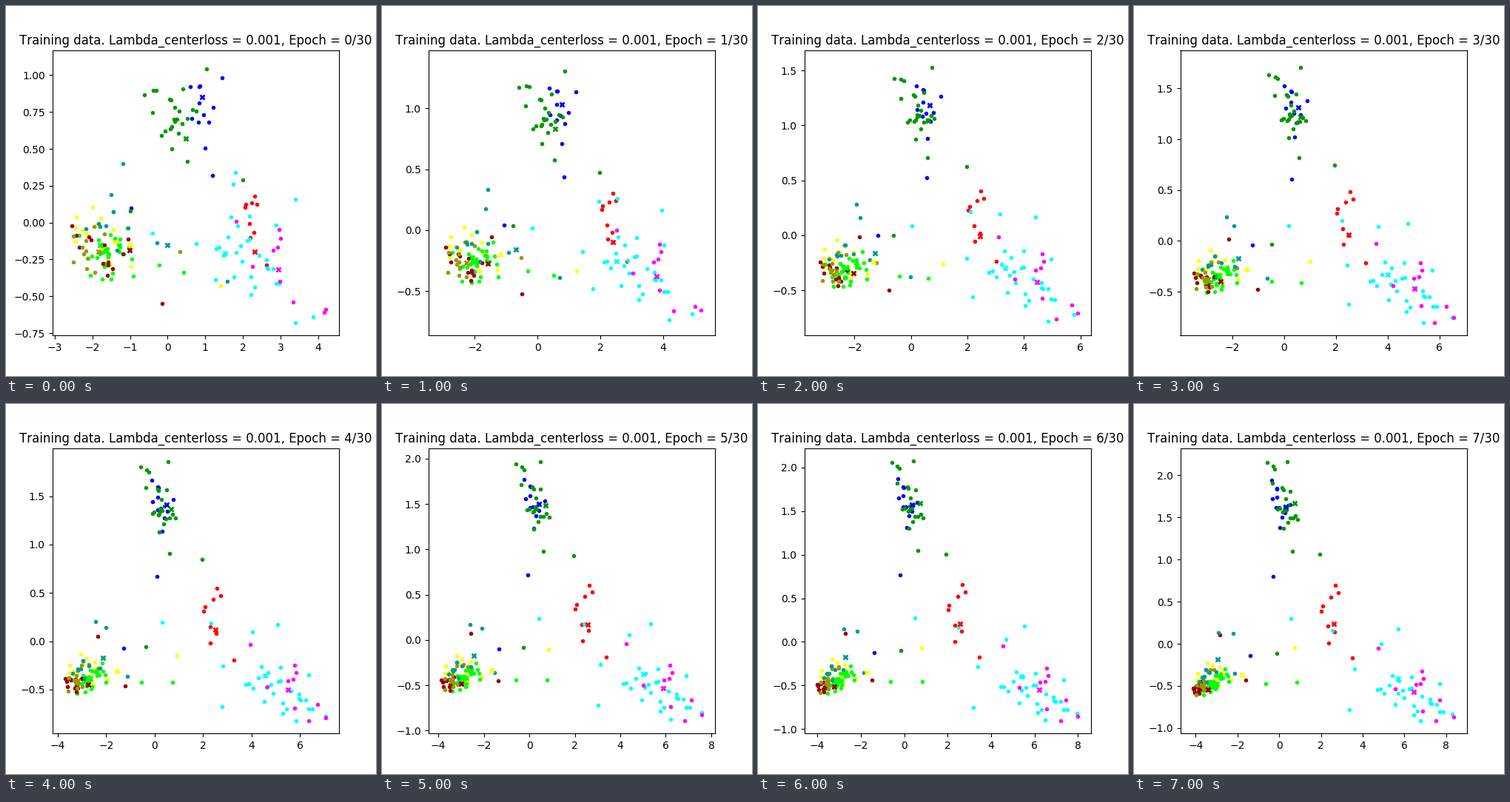
A matplotlib script for the animation above (8 s loop, 500 by 500 pixels).

```python
import numpy as np
import matplotlib.pyplot as plt
from matplotlib.animation import FuncAnimation

RED, YELLOW, LIME, CYAN, BLUE = '#ff0000', '#ffff00', '#00ff00', '#00ffff', '#0000ff'
MAGENTA, MAROON, OLIVE, GREEN, TEAL = '#ff00ff', '#990000', '#999900', '#009900', '#009999'
COLORS = [RED, YELLOW, LIME, CYAN, BLUE, MAGENTA, MAROON, OLIVE, GREEN, TEAL]

EPOCHS = 8

# data range at each epoch
X_MIN = [-2.72, -3.07, -3.32, -3.495, -3.69, -3.867, -4.0, -4.117]
X_MAX = [4.21, 5.236, 5.91, 6.557, 7.08, 7.59, 8.0, 8.376]
Y_MIN = [-0.677, -0.757, -0.792, -0.801, -0.818, -0.886, -0.9, -0.909]
Y_MAX = [1.08, 1.369, 1.565, 1.747, 1.86, 1.971, 2.07, 2.166]

rng = np.random.default_rng(7)
paths = {c: [] for c in COLORS}
centers = {}


def ease(epoch):
    """Training moves fast at first, then settles."""
    k = 1.35
    return (1 - np.exp(-k * epoch / (EPOCHS - 1))) / (1 - np.exp(-k))


def cloud(color, count, start, end):
    """Normal cloud; start and end are x, y, x spread, y spread, correlation."""
    u, v = np.clip(rng.standard_normal((2, count)), -1.9, 1.9)

    def place(x, y, sx, sy, r):
        return np.column_stack([x + sx * u, y + sy * (r * u + np.sqrt(1 - r * r) * v)])

    paths[color].append((place(*start), place(*end)))


def stray(color, start, end):
    paths[color].append((np.array([start]), np.array([end])))


def center(color, start, end):
    centers[color] = np.array(start), np.array(end)


cloud(RED, 9, (2.3, 0.05, 0.25, 0.2, -0.3), (2.65, 0.4, 0.65, 0.42, 0))
center(RED, (2.32, -0.2), (2.6, 0.24))

cloud(YELLOW, 17, (-1.5, -0.13, 0.5, 0.11, -0.4), (-2.9, -0.36, 0.55, 0.1, 0.4))
stray(YELLOW, (1.4, -0.43), (0.75, -0.04))
center(YELLOW, (-1.0, -0.15), (-1.77, -0.37))

cloud(LIME, 36, (-1.55, -0.2, 0.42, 0.11, -0.3), (-3.1, -0.45, 0.45, 0.07, 0.6))
stray(LIME, (0.42, -0.34), (0.85, -0.46))
stray(LIME, (-0.22, -0.29), (-0.65, -0.47))
center(LIME, (-1.8, -0.15), (-2.97, -0.47))

cloud(CYAN, 24, (2.25, -0.2, 0.5, 0.18, -0.4), (6.5, -0.6, 0.95, 0.16, -0.5))
stray(CYAN, (3.4, 0.16), (5.7, 0.18))
stray(CYAN, (-0.4, -0.07), (0.57, 0.3))
stray(CYAN, (1.75, 0.26), (2.55, 0.16))
stray(CYAN, (1.8, 0.34), (4.9, 0.0))
stray(CYAN, (0.75, -0.14), (3.6, -0.3))
stray(CYAN, (1.28, -0.39), (3.35, -0.78))
stray(CYAN, (3.4, -0.68), (6.75, -0.91))
stray(CYAN, (3.86, -0.64), (8.3, -0.83))
center(CYAN, (1.53, -0.21), (5.7, -0.41))

cloud(BLUE, 11, (1.0, 0.77, 0.33, 0.2, 0.3), (0.05, 1.63, 0.35, 0.2, -0.4))
stray(BLUE, (1.2, 0.32), (-0.3, 0.8))
stray(BLUE, (-0.98, 0.1), (-1.4, -0.14))
center(BLUE, (0.92, 0.85), (0.32, 1.63))

cloud(MAGENTA, 8, (2.5, -0.2, 0.55, 0.15, -0.6), (6.0, -0.45, 1.0, 0.27, -0.8))
stray(MAGENTA, (4.17, -0.61), (7.7, -0.67))
stray(MAGENTA, (4.21, -0.59), (8.37, -0.87))
center(MAGENTA, (2.95, -0.32), (6.46, -0.57))

cloud(MAROON, 12, (-1.6, -0.2, 0.5, 0.12, -0.6), (-3.85, -0.5, 0.14, 0.06, 0.4))
stray(MAROON, (-0.15, -0.55), (-1.6, -0.43))
stray(MAROON, (-1.05, -0.11), (-2.85, 0.11))
center(MAROON, (-1.02, -0.19), (-3.4, -0.54))

cloud(OLIVE, 11, (-2.15, -0.13, 0.25, 0.1, -0.3), (-3.6, -0.44, 0.25, 0.07, 0.5))
stray(OLIVE, (0.33, -0.2), (-3.3, -0.31))
center(OLIVE, (-1.84, -0.2), (-3.68, -0.49))

cloud(GREEN, 23, (0.1, 0.68, 0.38, 0.17, 0.2), (0.2, 1.62, 0.4, 0.25, -0.4))
stray(GREEN, (1.03, 1.04), (0.37, 2.166))
stray(GREEN, (2.0, 0.29), (1.93, 1.06))
stray(GREEN, (-1.0, 0.08), (-0.1, -0.11))
center(GREEN, (0.49, 0.57), (0.75, 1.67))

cloud(TEAL, 9, (-1.4, -0.02, 0.7, 0.12, -0.5), (-3.5, -0.36, 0.3, 0.07, 0.4))
stray(TEAL, (-1.18, 0.4), (-2.9, 0.13))
stray(TEAL, (-1.5, 0.19), (-2.2, 0.12))
stray(TEAL, (1.58, -0.4), (-2.15, -0.35))
center(TEAL, (0.0, -0.15), (-2.94, -0.18))


def span(low, high):
    margin = 0.05 * (high - low)
    return low - margin, high + margin


plt.rcParams['text.kerning_factor'] = 6
fig, ax = plt.subplots(figsize=(5, 5), dpi=100)
dots = {c: ax.plot([], [], '.', color=c)[0] for c in COLORS}
marks = {c: ax.plot([], [], 'x', color=c, ms=4, mew=2)[0] for c in COLORS}


def draw(epoch):
    low = X_MIN[epoch], Y_MIN[epoch]
    high = X_MAX[epoch], Y_MAX[epoch]
    ax.set_xlim(*span(low[0], high[0]))
    ax.set_ylim(*span(low[1], high[1]))
    ax.set_title(f'Training data. Lambda_centerloss = 0.001, Epoch = {epoch}/30')
    p = ease(epoch)
    for c in COLORS:
        points = np.vstack([a + p * (b - a) for a, b in paths[c]])
        dots[c].set_data(*np.clip(points, low, high).T)
        a, b = centers[c]
        x, y = a + p * (b - a)
        marks[c].set_data([x], [y])
    return []


anim = FuncAnimation(fig, draw, frames=EPOCHS, init_func=lambda: draw(0),
                     interval=1000, repeat=True, repeat_delay=0)
plt.show()
```
